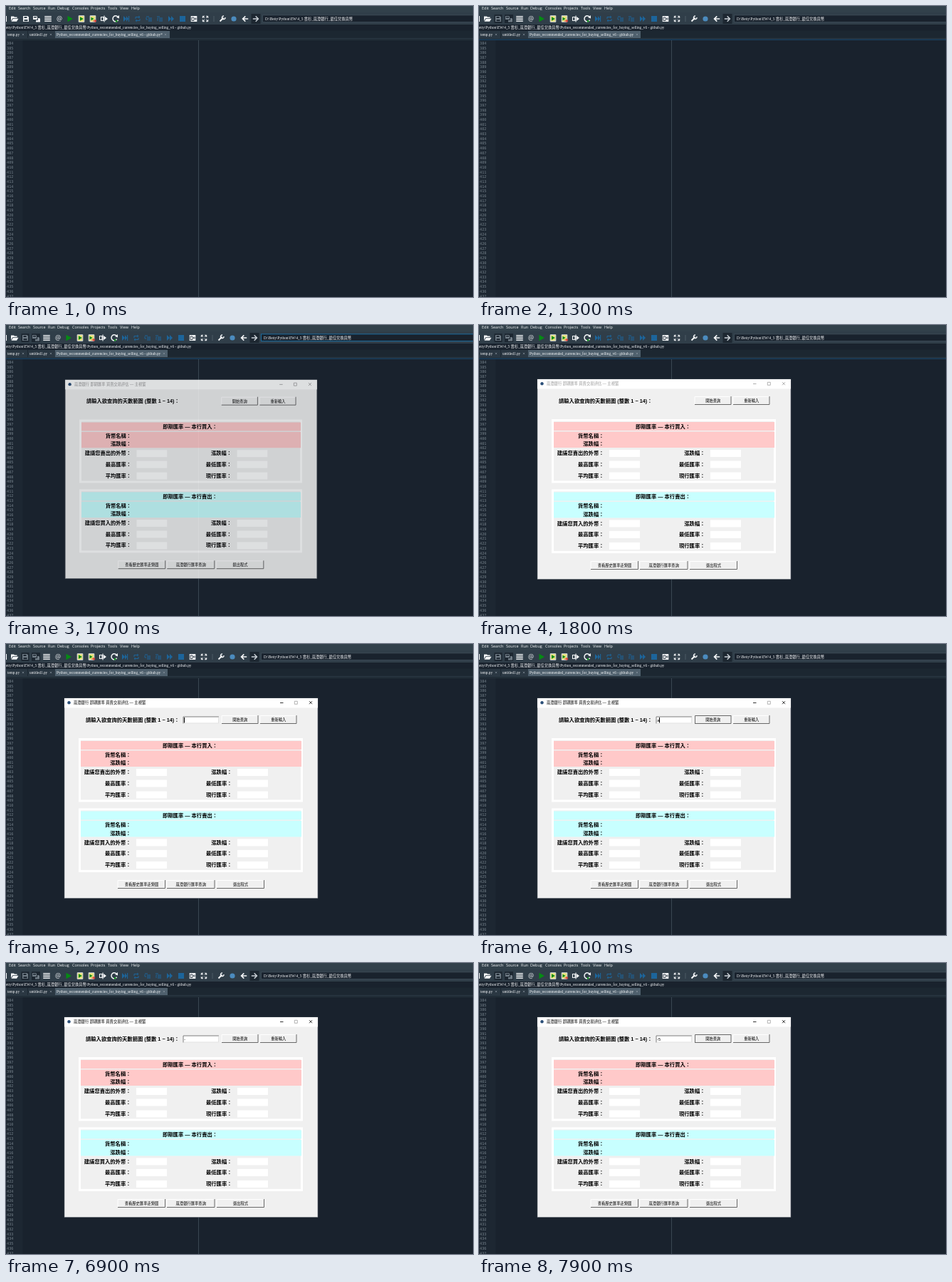
These frames come from a looping animation (656x408 px, 8 s). An HTML page:

```html
<!DOCTYPE html>
<html lang="zh-Hant">
<head>
<meta charset="utf-8">
<title>匯率查詢</title>
<style>
html, body { margin: 0; width: 100%; height: 100%; overflow: hidden; background: #19222d; }
svg { display: block; width: 656px; height: 408px; }
text { white-space: pre; }
.serif { font-family: "Liberation Serif", "Noto Sans CJK TC", serif; }
.ui { font-family: "Open Sans", "Noto Sans CJK TC", sans-serif; }
.mono { font-family: "DejaVu Sans Mono", monospace; }
.form { font-family: "Liberation Sans", "Noto Sans CJK TC", sans-serif; }
.bold { font-weight: 700; }
</style>
</head>
<body>
<svg id="stage" viewBox="0 0 656 408" xmlns="http://www.w3.org/2000/svg"></svg>
<script>
const BANK = '嵐澄銀行';
const FOLDER = `etty\\Python\\EW\\4_5 雲杉_${BANK}_最佳兌換貨幣`;
const FILE = 'Python_recommended_currencies_for_buying_selling_v6 - github.py';

const rect = (x, y, w, h, fill, more = '') =>
  `<rect x="${x}" y="${y}" width="${w}" height="${h}" fill="${fill}" ${more}/>`;
const path = (d, stroke, width = 1, fill = 'none') =>
  `<path d="${d}" stroke="${stroke}" stroke-width="${width}" fill="${fill}"/>`;
const shape = (d, fill) => `<path d="${d}" fill="${fill}"/>`;
// y is the middle of the line of text
const text = (x, y, s, size, cls, fill = '#000', more = '') =>
  `<text x="${x}" y="${y + size * .37}" font-size="${size}" class="${cls}" fill="${fill}" ${more}>${s}</text>`;
const at = (x, y, body) => `<g transform="translate(${x} ${y})">${body}</g>`;
const group = (id, body) => `<g id="${id}">${body}</g>`;
const MID = 'text-anchor="middle"', END = 'text-anchor="end"';

// ---- editor ----
const BG = '#19222d', BAR = '#32414b', W = '#f4f6f8', BLUE = '#1c659b', GREEN = '#068a14', YELLOW = '#e6e07a';
const floppy = shape('M-4-4H2.5L4-2.5V4H-4ZM-2.5-3V-1H1.5V-3ZM-2.5 1V3.2H2.5V1Z', 'currentColor');
const floppies = shape('M-5-4H0L1-3V1H-5ZM-4-3V-1.5H0V-3ZM2-1H4L5 0V4.5H-1V2H2Z', 'currentColor');
const cell = arrow => rect(-3.5, -4, 7, 8, YELLOW) + path('M-3.8-4.3H3.8V4.3H-3.8Z', W, .9) + shape(arrow, GREEN);
const steps = d => path('M-4-3H0M-1-1H4M-1 1H4M-1 3H4', BLUE, 1) + path(d, BLUE, .9);
const icons = [
  [59, path('M-4.8-3.3H4.8M-4.8-1.1H4.8M-4.8 1.1H4.8M-4.8 3.3H4.8', W, 1.3)],
  [75, text(0, 0, '@', 9, 'ui', W, MID)],
  [90, shape('M-3.5-4.3L4 0L-3.5 4.3Z', GREEN)],
  [106, cell('M-2-2.7L2.8 0L-2 2.7Z')],
  [122, cell('M-2.5-2.2L1.5 0L-2.5 2.2Z') + path('M0 3H4M2.5 1.2L4.5 3L2.5 4.5', '#d33', 1.1)],
  [138, path('M-4.5-2.5H-1V2.5H-4.5ZM0-4.5V4.5', W, 1.1) + shape('M1-3L5 0L1 3Z', W)],
  [154, path('M3.2-2.6A4 4 0 1 0 3.6 1.6', W, 1.5) + shape('M1-2L5-5V-.5Z', W) + shape('M0 1.5L3.5 3.2L0 5Z', GREEN)],
  [169, shape('M-4-4L0 0L-4 4ZM0-4L3 0L0 4Z', BLUE) + path('M3.6-4V4', BLUE, 1.1)],
  [185, path('M-3 0V-2.5H3M1.3-4L3-2.5L1.3-1M3 0V2.5H-3M-1.3 1L-3 2.5L-1.3 4', BLUE, 1)],
  [201, steps('M-4-2V1H-2')],
  [216, steps('M-3 3V-1H-2')],
  [232, shape('M-4-4L0 0L-4 4ZM0-4L4 0L0 4Z', BLUE)],
  [248, rect(-4, -4, 8, 8, BLUE)],
  [264, rect(-4.3, -4, 8.6, 8, W) + path('M-3-2H0V2.5H-3ZM1.5 0H4M2.5-1.5L1.2 0L2.5 1.5', '#2f3c47', .9)],
  [280, path('M-3.7-1V-3.7H-1M1-3.7H3.7V-1M3.7 1V3.7H1M-1 3.7H-3.7V1M-3.7-3.7L-1-1M3.7-3.7L1-1M3.7 3.7L1 1M-3.7 3.7L-1 1', W, 1)],
  [292, path('M0-4V4', '#53626e', .8)],
  [304, path('M-3.5 3.5L1.5-1.5', W, 1.9) + path('M4-2A2.3 2.3 0 1 1 2-4', W, 1.4)],
  [320, `<circle r="3.6" fill="#4b8bbe"/>`],
  [336, path('M4.2 0H-3M.3-3.7L-3.4 0L.3 3.7', W, 1.7)],
  [351, rect(-6.5, -7, 13, 14, '#1d2731') + path('M-4.2 0H3M-.3-3.7L3.4 0L-.3 3.7', '#c9d0d6', 1.5)]
];
const menu = [[4, 'Edit'], [17, 'Search'], [38, 'Source'], [59, 'Run'], [72, 'Debug'],
  [93, 'Consoles'], [119, 'Projects'], [143, 'Tools'], [160, 'View'], [176, 'Help']];

const closeTab = x => path(`M${x - 1.2} 38.8l2.4 2.4m0-2.4l-2.4 2.4`, '#8b98a3', .6);
const tab = (x, w, s) => rect(x, 35, w, 10, '#2a3742') + text(x + 2, 40, s, 5.25, 'serif', W) + closeTab(x + w - 6);

function editor() {
  let out = rect(0, 0, 656, 408, BG) + rect(0, 0, 656, 26, BAR) + rect(0, 9, 656, 17, '#303e49');
  out += menu.map(([x, s]) => text(x, 3.2, s, 5.5, 'ui', W)).join('');
  out += rect(0, 14, 1, 8, W) + at(12, 18, shape('M-5-3.5H-1L0-2.5H3.5V-1H-2.5L-5 3ZM-2-.2H5.5L3 3.8H-4.5Z', W));
  const pads = rect(22.5, 12, 11, 12, '#1d2731') + rect(37, 12, 12, 12, '#1d2731');
  out += group('saves', group('pads', pads) + at(28, 18, floppy) + at(43, 18, floppies));
  out += group('tools', icons.map(([x, body]) => at(x, 18, body)).join('') +
    rect(360.5, 12.8, 310, 9.8, BG, 'id="combo" stroke-width=".9"') +
    text(364, 17.6, 'D:\\B' + FOLDER, 5.25, 'serif', W));
  out += rect(0, 26, 656, 8.5, BG) + text(0, 30.4, FOLDER + '\\' + FILE, 5.25, 'serif', W);
  out += rect(0, 34.5, 656, 10.5, '#1c2731') + tab(0, 30, 'temp.py') + tab(31, 38, 'untitled1.py');
  out += rect(69, 35, 161, 10, '#4f606d', 'id="tab"') + text(71, 40, FILE + '<tspan id="star">*</tspan>', 5.25, 'serif', W);
  out += group('tabClose', closeTab(224)) + rect(0, 45, 656, 1, '#2b3944') + rect(0, 46.7, 656, 1, BAR, 'id="focus"');
  out += rect(0, 48, 23.5, 360, '#1d2732');
  for (let i = 0; i < 54; i++) out += text(1, 52 + i * 6.69, 384 + i, 5.25, 'mono', '#74808a');
  return out + rect(270, 48, 1, 360, '#3a4651');
}

// ---- dialog window ----
const button = (id, x, y, w, s) => `<g id="${id}">` + rect(x, y, w, 12, '#f0f0f0') +
  path(`M${x} ${y + 11.5}V${y + .5}H${x + w}`, '#fff', 1) +
  path(`M${x} ${y + 11.5}H${x + w - .5}V${y}`, '#696969', 1) +
  text(x + w / 2, y + 6.2, s, 5.3, 'form', '#000', MID) + '</g>';
const label = (x, y, s, more = END) => text(x, y, s, 7.3, 'form bold', '#000', more);

function panel(y, color, deal, advice) {
  const row = (dy, left, right) => label(175.5, y + dy, left) + label(317.5, y + dy, right) +
    rect(183, y + dy - 4.5, 43, 10, '#fff') + rect(325, y + dy - 4.5, 43, 10, '#fff');
  return rect(103.5, y + 1.5, 312, 86.5, '#f0f0f0', 'stroke="#fff" stroke-width="3"') +
    rect(105, y + 4, 310, 12, color) + rect(105, y + 17.5, 310, 22.5, color) +
    label(220, y + 10, `即期匯率 — 本行${deal}：`, '') +
    label(175.5, y + 23, '貨幣名稱：') + label(175.5, y + 34.5, '漲跌幅：') +
    row(47.5, `建議您${advice}的外幣：`, '漲跌幅：') +
    row(63, '最高匯率：', '最低匯率：') + row(79, '平均匯率：', '現行匯率：');
}

function dialog() {
  const frame = rect(82, 76, 356, 280.5, '#f0f0f0', 'stroke="#5b636b" stroke-width=".6"') +
    rect(82, 76, 356, 13.5, '#fff') + '<circle cx="88.5" cy="82.3" r="2.2" fill="#2b4f78"/>' +
    group('caption', text(95, 82.5, `${BANK} 即期匯率 買賣交易評估 — 主視窗`, 5.3, 'form', 'currentColor') +
      path('M385 82.5H389.5M426 80.2l4 4m0-4l-4 4', 'currentColor', .8)) +
    path('M405.3 80.3h4v4h-4Z', '#a0a0a0', .8);
  const blank = path('M103.5 133.5h312v87h-312ZM103.5 232h312v87h-312Z', '#fff', 3) + rect(156, 329, 208, 17, '#fff');
  const entry = rect(249.5, 102.5, 49, 8.5, '#fff') + path('M249 111.5V102H299', '#808080', 1) +
    path('M249.5 111H298.5V102.5', '#d8d8d8', .7) +
    text(250.3, 106.7, '', 5.4, 'form', '#000', 'id="typed"') + rect(250, 103, 1, 7.5, '#000', 'id="caret"');
  const body = label(112, 106, '請輸入欲查詢的天數範圍 (整數 1 ~ 14)：', '') +
    button('start', 303, 100, 51.5, '開始查詢') + button('reset', 357, 100, 51.5, '重新輸入') +
    group('pressed', path('M303.5 112V100.5H354', '#696969', 1)) +
    panel(132, '#ffc9c9', '買入', '賣出') + panel(230.4, '#c8ffff', '賣出', '買入') +
    button('history', 157, 331, 67, '查看歷史匯率走勢圖') + button('bank', 226, 331, 67.5, BANK + '匯率查詢') +
    button('quit', 296, 331, 67, '退出程式');
  return frame + group('blank', blank) + group('body', body + group('entry', entry));
}

const stage = document.getElementById('stage');
stage.innerHTML = editor() + group('dialog', dialog());
const el = id => document.getElementById(id);
const show = (id, on) => el(id).setAttribute('display', on ? 'inline' : 'none');
const set = (id, name, value) => el(id).setAttribute(name, value);
const within = (t, a, b) => t >= a && t < b;

function draw(t) {
  // editor: saving the file, focus border
  const saved = t >= 1300;
  show('pads', saved);
  set('saves', 'color', saved ? '#6f7b85' : W);
  set('saves', 'transform', `translate(${saved ? -1 : 0} 0)`);
  set('tools', 'transform', `translate(${saved ? -2 : 0} 0)`);
  set('tab', 'width', saved ? 158 : 161);
  set('tabClose', 'transform', `translate(${saved ? -2 : 0} 0)`);
  show('star', !saved);
  const lit = within(t, 300, 500) || within(t, 1000, 2600);
  set('focus', 'fill', lit ? '#1d4f78' : '#2b3944');
  set('combo', 'stroke', within(t, 1600, 1800) ? '#1a72a8' : '#3d4c57');

  // window opening: fades in while growing to full size
  const k = Math.min(1, Math.max(0, (t - 1600) / 200));
  const ease = 1 - (1 - k) ** 2;
  show('dialog', t >= 1600);
  set('dialog', 'opacity', .42 + .58 * ease);
  set('dialog', 'transform', `translate(260 216) scale(${.974 + .026 * ease}) translate(-260 -216)`);
  show('blank', t < 1700);
  show('body', t >= 1700);
  show('entry', t >= 1900);
  set('caption', 'color', t < 2600 ? '#999' : '#000');

  // typing
  const typed = within(t, 3300, 4900) ? 'a' : t >= 7100 ? '-5' : t >= 6400 ? '-' : '';
  const width = { '': 0, a: 3, '-': 1.8, '-5': 4.8 }[typed];
  el('typed').textContent = typed;
  set('caret', 'x', 250 + width);
  show('caret', t >= 2700 && (t - 2700) % 900 < 600);
  show('pressed', within(t, 4100, 4900) || t >= 7900);
}

function tick(now) {
  draw(Math.floor(now % 8000 / 100) * 100);
  requestAnimationFrame(tick);
}
draw(0);
requestAnimationFrame(tick);
</script>
</body>
</html>
```
